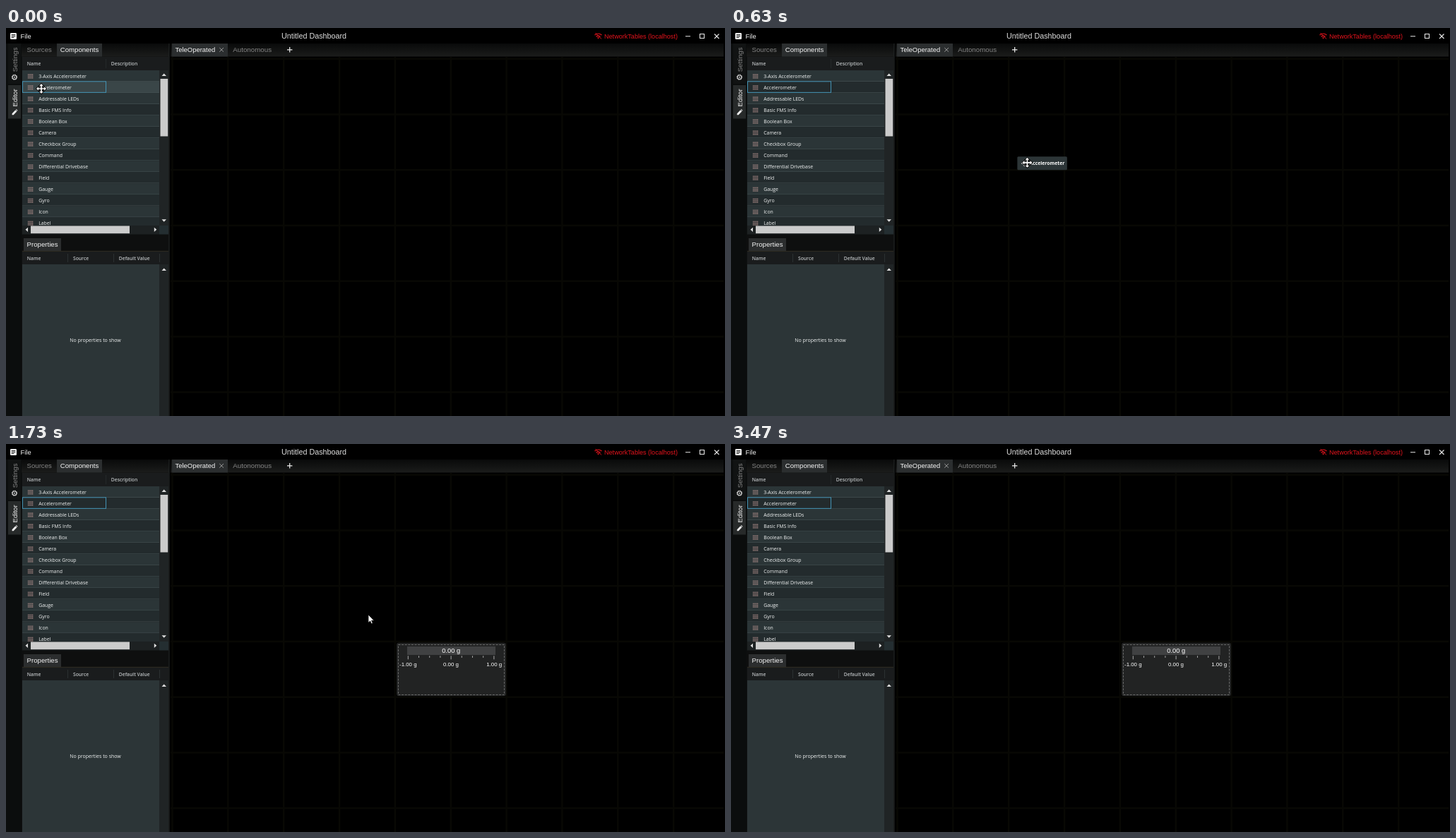
These frames come from a looping animation (1018 px wide and 550 px high, 3510 ms). An HTML page:

```html
<!DOCTYPE html>
<html lang="en">
<head>
<meta charset="utf-8">
<title>Untitled Dashboard</title>
<style>
html, body { margin: 0; width: 100%; height: 100%; overflow: hidden; background: #000; }
svg { display: block; }
text { font-family: "Liberation Sans", Arial, sans-serif; white-space: pre; }
.grid { font-family: "Open Sans", "Noto Sans", sans-serif; }
</style>
</head>
<body>
<svg id="stage" width="1018" height="550" viewBox="0 0 1018 550"></svg>
<script>
const LOOP = 3510, DRAG = 100, DROP = 1450;
const ROW = 16.03, TOP = 60;
const names = ['3-Axis Accelerometer', 'Accelerometer', 'Addressable LEDs', 'Basic FMS Info',
  'Boolean Box', 'Camera', 'Checkbox Group', 'Command', 'Differential Drivebase', 'Field',
  'Gauge', 'Gyro', 'Icon', 'Label'];

const rect = (x, y, w, h, fill, extra = '') =>
  `<rect x="${x}" y="${y}" width="${w}" height="${h}" fill="${fill}" ${extra}/>`;
const path = (d, stroke, width = 1, extra = '') =>
  `<path d="${d}" fill="none" stroke="${stroke}" stroke-width="${width}" ${extra}/>`;
const shape = (d, fill, extra = '') => `<path d="${d}" fill="${fill}" ${extra}/>`;
const text = (x, y, str, size, fill, extra = '') =>
  `<text x="${x}" y="${y}" font-size="${size}" fill="${fill}" ${extra}>${str}</text>`;
const cell = (x, y, str, size = 6.92, fill = '#f0f2f2', extra = '') =>
  text(x, y, str, size, fill, `class="grid" ${extra}`);
const head = (x, y, str) => cell(x, y, str, 6.75, '#bcc0c2', 'font-weight="600"');
const range = (n, f) => Array.from({ length: n }, (_, i) => f(i)).join('');

// Four-way arrow centred on the origin, r = reach of each arm
function moveIcon(r, fill, outline) {
  const h = r * .4, s = r * .12, b = r * .58;
  const arm = `M${-s} 0V${-b}H${-h}L0 ${-r}L${h} ${-b}H${s}V0Z`;
  const arms = stroke => range(4, i => shape(arm, fill, `transform="rotate(${i * 90})" ${stroke}`));
  return (outline ? arms('stroke="#000" stroke-width="1.6"') : '') + arms('');
}

function titleBar() {
  return rect(0, 0, 1018, 22, '#000') +
    rect(6, 7, 9, 9, '#f4f4f4', 'rx="1.2"') +
    path('M7.7 9.5H13.3M7.7 11.5H13.3M7.7 13.5H11.5', '#000', .9) +
    text(20.6, 14.7, 'File', 9.3, '#f2f2f2') +
    text(436, 15, 'Untitled Dashboard', 10.75, '#dedede', 'text-anchor="middle"') +
    path('M833.5 10Q838.5 6 843.5 10M835.5 12.3Q838.5 10 841.5 12.3', '#e3131c', 1.2) +
    path('M834.5 7L843 15.5', '#e3131c', 1) + shape('M836.8 13.2H840.2L838.5 15.6Z', '#e3131c') +
    text(847, 14.6, 'NetworkTables (localhost)', 9.08, '#e3131c') +
    path('M962 11.7H969M982.5 8.5H988.5V14.5H982.5ZM1003 8.5L1009.5 15M1009.5 8.5L1003 15', '#e8e8e8', 1.1);
}

function sideBar() {
  const gear = '<circle cx="12" cy="69.7" r="2.9" fill="none" stroke="#c8c8c8" stroke-width="1.3"/>' +
    '<circle cx="12" cy="69.7" r="3.7" fill="none" stroke="#c8c8c8" stroke-width="1" stroke-dasharray="1.5 1.4"/>' +
    '<circle cx="12" cy="69.7" r="1" fill="#c8c8c8"/>';
  return rect(0, 22, 22, 528, '#0b0d0d') + rect(3, 22, 18, 57, '#111313') +
    rect(3, 81, 18, 47.5, '#272a2a') +
    text(0, 0, 'Settings', 9.65, '#858585', 'transform="translate(15.6 62.3) rotate(-90)"') + gear +
    text(0, 0, 'Editor', 9.65, '#f4f4f4', 'transform="translate(15.6 111.5) rotate(-90)"') +
    shape('M8.6 123.2V121.2L13.4 116.3L15.4 118.3L10.6 123.2ZM14 115.7L14.7 115L16.6 116.9L15.9 117.7Z', '#f2f2f2');
}

function componentList() {
  const rows = names.map((name, i) => {
    const y = TOP + i * ROW;
    return rect(23, y, 194, ROW, i % 2 ? '#232b2d' : '#2b3537') +
      (i === 1 ? rect(23, y, 194, ROW, '#3a4648', 'id="hover"') : '') +
      path(`M23 ${y + ROW - .4}H217`, '#465153', .8) +
      `<g ${i === 1 ? 'id="dragged"' : ''}>` +
      path(range(4, k => `M${31.7 + k * 2} ${y + 5.3}v6.4`), '#c49c98', 1, 'stroke-dasharray="1.6 .7"') +
      cell(46.2, y + 10.7, name) +
      (i === 1 ? rect(23.5, y - .2, 118, ROW - .5, 'none', 'stroke="#4393b4"') : '') + '</g>';
  }).join('');
  return rect(22, 22, 209, 528, '#0f1111') + rect(22, 22, 209, 18.5, 'url(#bar)') +
    rect(72, 22, 64, 18.5, '#2b2e2f') +
    text(29.6, 34, 'Sources', 9.6, '#858585') + text(76.8, 34, 'Components', 9.6, '#f6f6f6') +
    rect(23, 41, 207, 19, '#1a1c1d') + head(29.8, 52.9, 'Name') + head(148.8, 52.9, 'Description') +
    path('M141.5 44V57', '#25292a') +
    `<g clip-path="url(#list)">${rows}</g>` +
    rect(217, 60, 13, 220, '#202425') + rect(218.5, 72, 10.7, 81.5, '#cbcbcb') +
    shape('M220.5 68L223.7 64.5L227 68ZM220.5 271.2L223.7 274.7L227 271.2Z', '#dedede') +
    rect(23, 280, 194, 12.5, '#1d2122') + rect(217, 280, 13, 12.5, '#242e31') +
    rect(35, 280.5, 140, 10.7, '#cbcbcb') +
    shape('M31 282.7L27.5 285.8L31 289ZM209.8 282.7L213.3 285.8L209.8 289Z', '#dedede') +
    path('M23 139H217', '#41a6cf', 1.7, 'id="marker"');
}

function properties() {
  return rect(22, 293, 209, 24, '#0e0f0f') + rect(25, 298, 53, 18, '#2b2d2e') +
    text(29.6, 310, 'Properties', 9.65, '#f4f4f4') + path('M23 316.4H230', '#353226', .9) +
    rect(23, 317, 207, 18, '#1a1c1d') +
    head(29.8, 328.8, 'Name') + head(95, 328.8, 'Source') + head(159.8, 328.8, 'Default Value') +
    path('M87.5 320V332M152.5 320V332M217.5 320V332', '#2b3031') +
    rect(23, 335, 194, 215, '#2c3537') + rect(217, 335, 13, 215, '#202425') +
    shape('M220.5 344L223.7 340.5L227 344Z', '#dedede') +
    cell(126.5, 445.3, 'No properties to show', 7, '#f0f2f2', 'text-anchor="middle"') +
    path('M231 22V550', '#222525', 1.2);
}

function board() {
  const lines = range(10, i => `M${235.5 + i * 78.85} 41V550`) + range(7, i => `M233 ${43.8 + i * 78.75}H1016`);
  return rect(232, 22, 786, 528, '#000') + path(lines, '#080804', 2.5) +
    rect(233, 22, 783, 18.5, 'url(#bar)') + rect(235, 22, 79, 18.5, '#2b2e2f') +
    text(239.5, 34, 'TeleOperated', 9.45, '#f6f6f6') + path('M302.3 28L308 33.7M308 28L302.3 33.7', '#999') +
    text(321.3, 34, 'Autonomous', 9.75, '#858585') + path('M398 30.8H405.4M401.7 27V34.5', '#eee', 1.2);
}

function widget() {
  const ticks = range(9, i => `M${569.3 + i * 15.2} 300.3v${i % 4 ? 2.6 : 5}`);
  const label = (x, y, str, size) => text(x, y, str, size, '#fff', 'text-anchor="middle"');
  return rect(553, 281.7, 155, 75.5, '#222323', 'rx="3"') +
    rect(555.5, 284.5, 150, 71, 'none', 'stroke="#727272" stroke-width=".9" stroke-dasharray="3 1.6"') +
    rect(568, 287, 125, 12, '#404142') + label(630.2, 295.7, '0.00 g', 9.35) + path(ticks, '#bcbcbc', .9) +
    label(569.3, 315.4, '-1.00 g', 7.9) + label(630, 315.4, '0.00 g', 7.9) + label(691.2, 315.4, '1.00 g', 7.9);
}

const tag = rect(0, 0, 70.5, 19, '#2c3537', 'rx="1.5"') +
  `<g transform="translate(10 9.5)">${moveIcon(4.6, '#e8e8e8')}</g>` +
  cell(17.2, 12, 'Accelerometer', 6.8, '#fff', 'font-weight="700"');

const arrow = shape('M0 0V11.3L2.6 8.9L4.4 12.8L6.2 12L4.5 8.2H8Z', '#fff', 'stroke="#000" stroke-width=".7"');

const stage = document.getElementById('stage');
stage.innerHTML =
  `<defs><linearGradient id="bar" x2="0" y2="1"><stop stop-color="#090a0a"/><stop offset="1" stop-color="#1b1c1b"/></linearGradient>
  <clipPath id="list">${rect(22, 60, 195, 220, '#000')}</clipPath></defs>` +
  titleBar() + sideBar() + componentList() + properties() + board() +
  `<g id="widget">${widget()}</g><g id="tag">${tag}</g>` +
  `<g id="move">${moveIcon(7, '#fff', true)}</g><g id="arrow">${arrow}</g>`;
// The drop marker may not be hidden by later panels
const el = id => document.getElementById(id);

// Pointer path: time, x, y
const keys = [[0, 50, 86], [110, 58, 88], [370, 223, 138.7], [630, 419, 190.7], [900, 502, 232],
  [1170, 513, 243], [1730, 513, 242], [2300, 513, 241], [2530, 513, 234], [2750, 513, 205],
  [3000, 513, 85], [3200, 513, -16], [LOOP, 513, -16]];

const slope = (i, c) => (keys[i + 1][c] - keys[i][c]) / (keys[i + 1][0] - keys[i][0]);
function tangent(i, c) {
  if (i === 0 || i === keys.length - 1) return 0;
  const a = slope(i - 1, c), b = slope(i, c);
  return a * b > 0 ? 2 * a * b / (a + b) : 0;
}
// Monotone cubic through the keys
function pointer(t) {
  let i = 0;
  while (i < keys.length - 2 && t >= keys[i + 1][0]) i++;
  const span = keys[i + 1][0] - keys[i][0], u = Math.max(0, (t - keys[i][0]) / span);
  return [1, 2].map(c => {
    const p = keys[i][c], q = keys[i + 1][c];
    return p + (q - p) * u * u * (3 - 2 * u) +
      span * u * (1 - u) * (tangent(i, c) * (1 - u) - tangent(i + 1, c) * u);
  });
}

const show = (id, on) => el(id).setAttribute('visibility', on ? 'visible' : 'hidden');
const place = (id, x, y) => el(id).setAttribute('transform', `translate(${x.toFixed(2)} ${y.toFixed(2)})`);

function draw(t) {
  const [x, y] = pointer(t), [lagX, lagY] = pointer(t - 15);
  const dragging = t >= DRAG && t < DROP, overList = dragging && x < 230;
  const line = TOP + Math.round((y - TOP) / ROW) * ROW - 1;
  show('hover', t < DRAG);
  el('dragged').setAttribute('opacity', overList ? .42 : 1);
  show('marker', overList);
  el('marker').setAttribute('d', `M23 ${line}H217`);
  show('tag', dragging);
  place('tag', lagX - 7, lagY - 6);
  show('move', t < DROP);
  place('move', x, y);
  show('arrow', t >= DROP && y > -15);
  place('arrow', x, y);
  show('widget', t >= DROP);
}

const start = performance.now();
function tick() {
  draw((performance.now() - start) % LOOP);
  requestAnimationFrame(tick);
}
tick();
</script>
</body>
</html>
```
